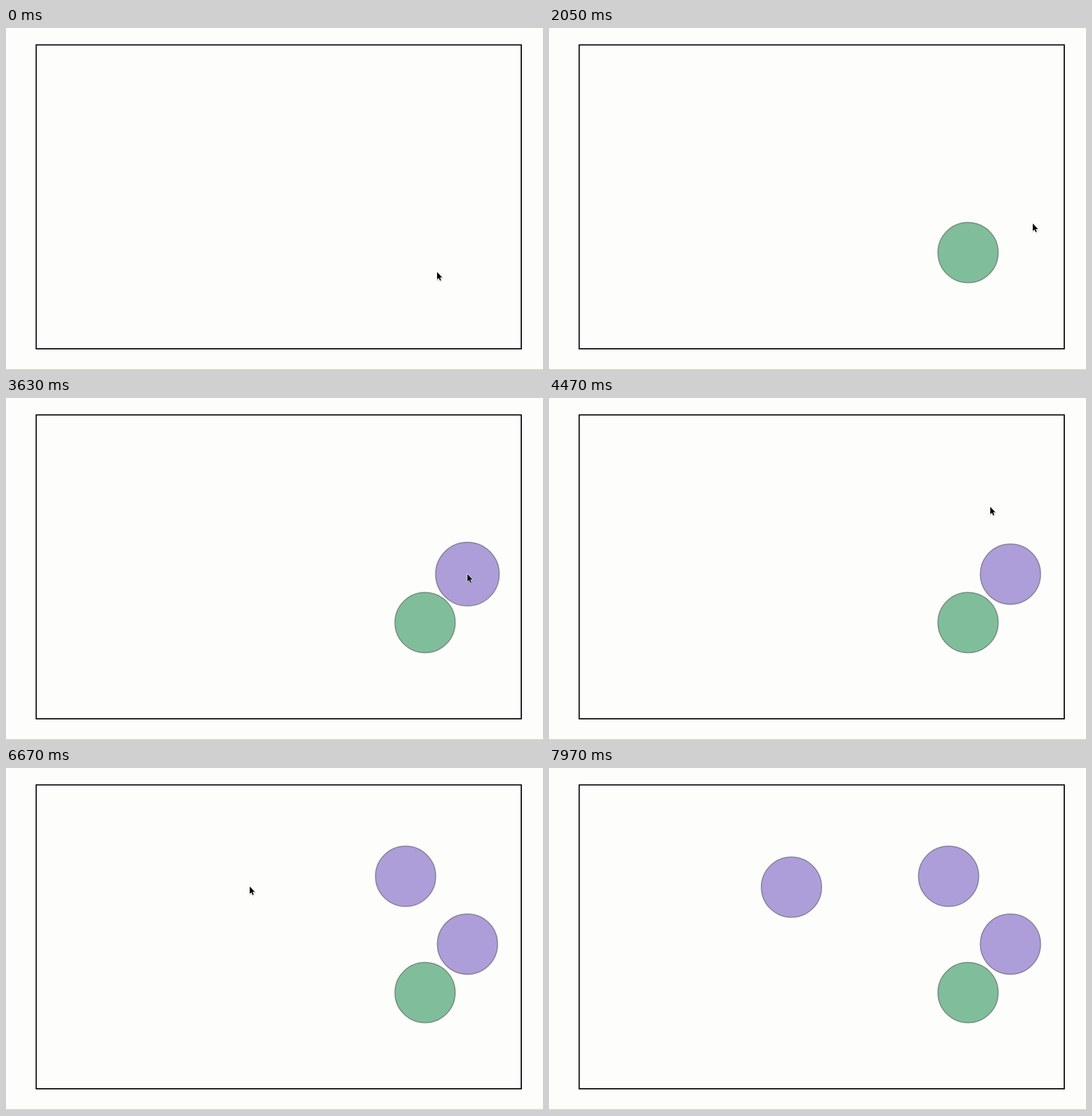
These frames come from a looping animation (938 by 597 pixels, 8000 ms). An HTML page:

```html
<!DOCTYPE html>
<html lang="en">
<head>
<meta charset="utf-8">
<title>Click to add circles</title>
<style>
  html, body { margin: 0; width: 100%; height: 100%; overflow: hidden; background: #fdfdfc; }
  svg { display: block; width: 100vw; height: 100vh; }
</style>
</head>
<body>
<svg viewBox="0 0 938 597">
  <rect width="938" height="597" fill="#fdfdfc"/>
  <rect y="596" width="938" height="1" fill="#bfbf91"/>
  <rect x="52.7" y="29.5" width="847.3" height="530.5" fill="none" stroke="#000" stroke-width="2"/>
  <g id="circles" stroke-width="2"></g>
  <g id="cursor">
    <path d="M0 0V13L3 10.3L5 15L7 14.2L5 9.6H9Z" transform="translate(.6 1.4)"
          stroke="#000" stroke-width="2" opacity=".12"/>
    <path d="M0 0V13L3 10.3L5 15L7 14.2L5 9.6H9Z"
          stroke="#fff" stroke-width="1.4" paint-order="stroke"/>
  </g>
</svg>
<script>
const LOOP = 8000, RADIUS = 52.5, POP = 300;
const GREEN = { fill: '#80be9b', stroke: '#799182' };
const PURPLE = { fill: '#ad9eda', stroke: '#8c869d' };

// The pointer arrives, clicks, rests until it leaves, then passes the via points
const circles = [
  { x: 732, y: 392, arrive: 220, click: 230, leave: 670, color: GREEN,
    via: [point(1350, 887, 351), point(1720, 922, 357), point(2230, 812, 333), point(2750, 805, 326)] },
  { x: 806, y: 307.4, arrive: 3050, click: 3450, leave: 3740, color: PURPLE,
    via: [point(4190, 893, 208), point(4470, 771, 190)] },
  { x: 698, y: 189, arrive: 4850, click: 5290, leave: 5520, color: PURPLE,
    via: [point(5730, 739, 136), point(6120, 654, 108)] },
  { x: 423.5, y: 208, arrive: 6710, click: 6830, leave: 7120, color: PURPLE,
    via: [point(7830, 945, 441), point(LOOP, 945, 441)] }
];

const path = [
  point(0, 753, 426),
  ...circles.flatMap(c => [point(c.arrive, c.x, c.y), point(c.leave, c.x, c.y), ...c.via])
];

const layer = document.getElementById('circles');
const cursor = document.getElementById('cursor');

for (const c of circles) {
  c.node = document.createElementNS('http://www.w3.org/2000/svg', 'circle');
  for (const [name, value] of Object.entries({ cx: c.x, cy: c.y, ...c.color }))
    c.node.setAttribute(name, value);
  layer.append(c.node);
}

function point(t, x, y) {
  return { t, x, y };
}

function slope(i, axis) {
  return (path[i + 1][axis] - path[i][axis]) / (path[i + 1].t - path[i].t);
}

// Harmonic mean of neighbouring slopes keeps the curve free of overshoot
function tangent(i, axis) {
  if (i === 0 || i === path.length - 1) return 0;
  const a = slope(i - 1, axis), b = slope(i, axis);
  return a * b > 0 ? 2 * a * b / (a + b) : 0;
}

function pointerAt(t, axis) {
  const i = path.findLastIndex(p => p.t <= t);
  const from = path[i], to = path[i + 1], span = to.t - from.t;
  const u = (t - from.t) / span, v = 1 - u;
  return v * v * (1 + 2 * u) * from[axis] + u * u * (3 - 2 * u) * to[axis]
    + span * u * v * (v * tangent(i, axis) - u * tangent(i + 1, axis));
}

function backOut(u) {
  const s = 1.25, v = u - 1;
  return 1 + v * v * ((s + 1) * v + s);
}

function render(t) {
  for (const c of circles) {
    const u = Math.min(1, (t - c.click) / POP);
    c.node.style.display = u > 0 ? '' : 'none';
    if (u > 0) c.node.setAttribute('r', Math.max(0, RADIUS * backOut(u)));
  }
  cursor.setAttribute('transform', `translate(${pointerAt(t, 'x')} ${pointerAt(t, 'y')})`);
}

const began = performance.now();
function tick() {
  render((performance.now() - began) % LOOP);
  requestAnimationFrame(tick);
}
tick();
</script>
</body>
</html>
```
